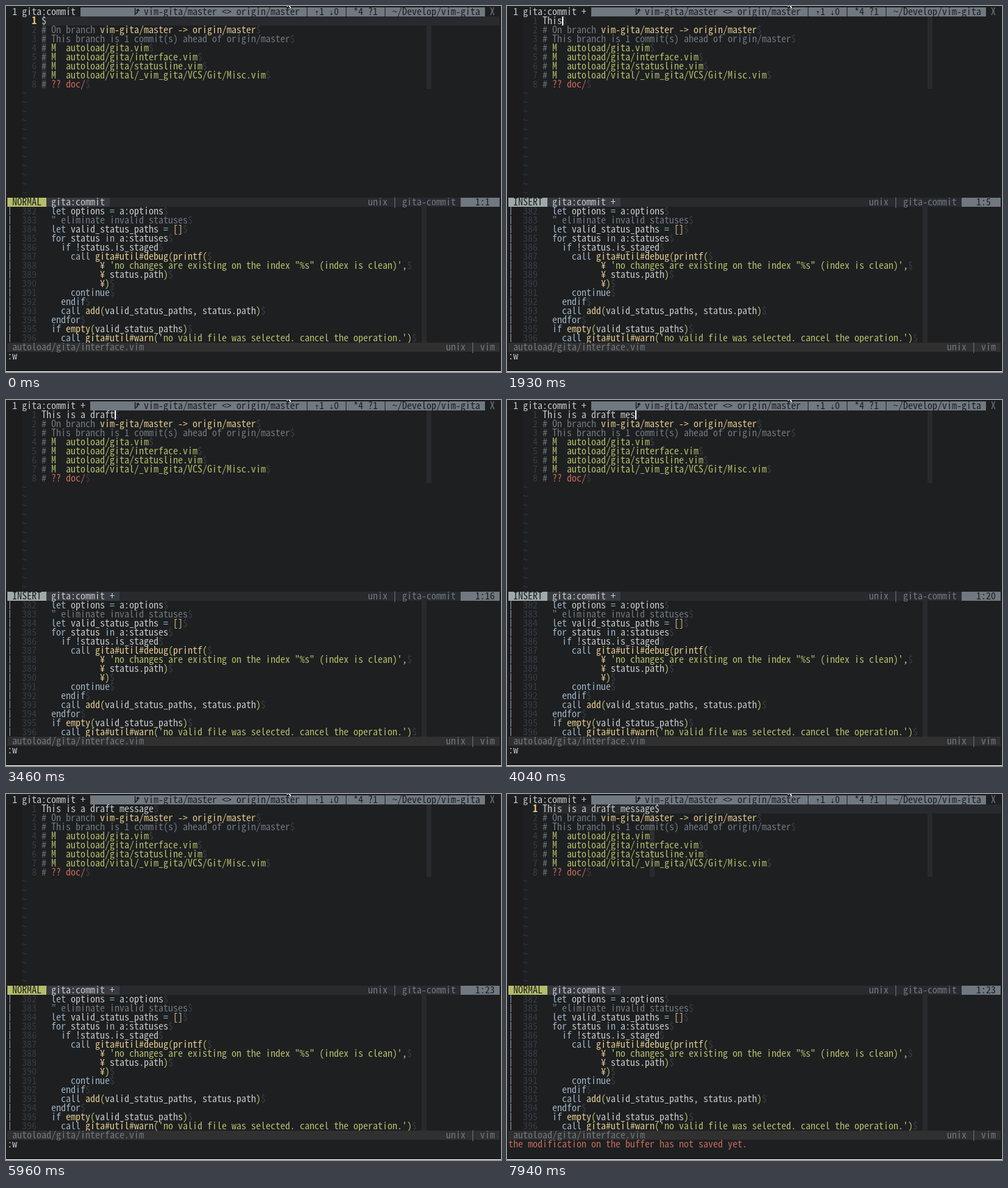
Write an HTML page that moves like this. It is 711 by 525 pixels and loops after 8 s.

```html
<!DOCTYPE html>
<html lang="en">
<head>
<meta charset="utf-8">
<title>Commit message in an editor</title>
<style>
  html, body { margin: 0; width: 100%; height: 100%; overflow: hidden; background: #1d1f21; }
  svg { display: block; width: 711px; height: 525px; }
  text { white-space: pre; font: 14px "Noto Sans Mono CJK JP", "Noto Sans Mono", monospace; font-variant-ligatures: none; }
  .plain text { font: 11.667px "Noto Sans Mono", "DejaVu Sans Mono", monospace; }
  svg text.arrow { font: 11.6px "DejaVu Sans Mono", monospace; }
  svg text.bold { font-weight: 700; }
</style>
</head>
<body>
<svg id="stage" viewBox="0 0 711 525" xmlns="http://www.w3.org/2000/svg"></svg>
<script>
const NS = 'http://www.w3.org/2000/svg';
const CELL = 7, LINE = 13, PAD = 2, COLS = 101, LOOP = 8000;
const C = {
  bg: '#1d1f21', gutter: '#1c1c1c', fg: '#c5c8c6', dim: '#373b41', panel: '#282a2e', idle: '#303030',
  gray: '#707880', key: '#9db0bf', blue: '#81a2be', green: '#b5bd68', yellow: '#f0c674',
  cream: '#e0c88c', red: '#c66a58', aqua: '#8abeb7', insert: '#a0a9a9', cursor: '#f4f4f4'
};
const stage = document.getElementById('stage');

// Without the half-em face, use one whose advance is 0.6 em.
const probe = document.createElement('canvas').getContext('2d');
probe.font = '14px "Noto Sans Mono CJK JP", monospace';
if (Math.abs(probe.measureText('mmmmmmmmmm').width - 70) > 0.6) stage.classList.add('plain');

function add(parent, tag, attrs, content) {
  const el = document.createElementNS(NS, tag);
  for (const name in attrs) el.setAttribute(name, attrs[name]);
  if (content !== undefined) el.textContent = content;
  parent.appendChild(el);
  return el;
}
const X = col => PAD + col * CELL;
const Y = row => PAD + row * LINE;

function box(g, col, row, cols, rows, fill) {
  add(g, 'rect', { x: X(col), y: Y(row), width: cols * CELL, height: rows * LINE, fill });
}
function put(g, col, row, str, fill, cls = '') {
  add(g, 'text', { x: X(col), y: Y(row) + 11, fill, class: cls, 'xml:space': 'preserve' }, str);
}
// Writes [colour, text, colour, text, ...] from a column and returns the end column.
function runs(g, col, row, parts) {
  for (let i = 0; i < parts.length; i += 2) {
    put(g, col, row, parts[i + 1], C[parts[i]]);
    col += parts[i + 1].length;
  }
  return col;
}

const code = [
  [2, 'key', 'let ', 'fg', 'options ', 'aqua', '= ', 'fg', 'a:options'],
  [2, 'gray', '" eliminate invalid statuses'],
  [2, 'key', 'let ', 'fg', 'valid_status_paths ', 'aqua', '= ', 'cream', '[]'],
  [2, 'key', 'for ', 'fg', 'status ', 'key', 'in ', 'fg', 'a:statuses'],
  [4, 'key', 'if ', 'fg', '!status.is_staged'],
  [6, 'key', 'call ', 'cream', 'gita#util#debug', 'green', '(', 'cream', 'printf', 'green', '('],
  [12, 'cream', '¥ ', 'green', '\'no changes are existing on the index "%s" (index is clean)\'', 'fg', ','],
  [12, 'cream', '¥ ', 'fg', 'status.path', 'green', ')'],
  [12, 'cream', '¥', 'green', ')'],
  [6, 'key', 'continue'],
  [4, 'key', 'endif'],
  [4, 'key', 'call ', 'cream', 'add', 'green', '(', 'fg', 'valid_status_paths, status.path', 'green', ')'],
  [2, 'key', 'endfor'],
  [2, 'key', 'if ', 'cream', 'empty', 'green', '(', 'fg', 'valid_status_paths', 'green', ')'],
  [4, 'key', 'call ', 'cream', 'gita#util#warn', 'green', "('no valid file was selected. cancel the operation.')"]
];
const info = [
  ['gray', '# On branch ', 'cream', 'vim-gita/master -> origin/master'],
  ['gray', '# This branch is 1 commit(s) ahead of origin/master'],
  ...['gita.vim', 'gita/interface.vim', 'gita/statusline.vim', 'vital/_vim_gita/VCS/Git/Misc.vim']
    .map(file => ['gray', '# ', 'green', 'M  autoload/' + file]),
  ['gray', '# ', 'red', '?? doc/']
];

const under = add(stage, 'g', {});
const base = add(stage, 'g', {});
const live = add(stage, 'g', {});

function drawBase(g) {
  box(g, 0, 1, 3, 20, C.gutter);
  info.forEach((parts, i) => {
    put(g, 5, i + 2, String(i + 2), C.dim);
    put(g, runs(g, 7, i + 2, parts), i + 2, '$', C.dim);
  });
  for (let row = 9; row < 21; row++) put(g, 3, row, '~', C.dim);

  box(g, 0, 22, 3, 15, C.gutter);
  box(g, 85, 22, 1, 15, C.panel);
  code.forEach(([indent, ...parts], i) => {
    const row = i + 22;
    add(g, 'rect', { x: 5, y: Y(row), width: 1, height: 12, fill: C.blue });
    put(g, 3, row, String(382 + i), C.dim);
    put(g, runs(g, 7 + indent, row, parts), row, '$', C.dim);
  });
  box(g, 0, 37, COLS, 1, C.idle);
  put(g, 1, 37, 'autoload/gita/interface.vim', C.gray);
  put(g, 90, 37, 'unix | vim', C.gray);
  add(g, 'rect', { x: 0, y: 524, width: 711, height: 1, fill: '#fff' });
}

function drawTabs(g, changed) {
  const left = changed ? 17 : 15;
  put(g, 1, 0, '1 gita:commit' + (changed ? ' +' : ''), C.fg);
  box(g, left, 0, 98 - left, 1, C.gray);
  add(g, 'path', { d: 'M185.5 3v10M185.5 11q4-1 4-5M187.5 7l2-2.5 2 2.5', fill: 'none', stroke: C.bg, 'stroke-width': 1.4 });
  put(g, 28, 0, 'vim-gita/master <> origin/master |', C.bg);
  put(g, 63, 0, '⇡', C.bg, 'arrow');
  put(g, 64, 0, '1', C.bg);
  put(g, 66, 0, '⇣', C.bg, 'arrow');
  put(g, 67, 0, '0 | *4 ?1 | ~/Develop/vim-gita', C.bg);
  put(g, 99, 0, 'X', C.gray);
  add(g, 'path', { d: 'M402 0h9v3l-2 1-2-2-2 2-3-2z', fill: C.bg });
  add(g, 'path', { d: 'M403 0h2l-1 1.5zM406 0h2l2 3-1.5.5z', fill: '#fff' });
}

function drawStatus(g, s) {
  const insert = s.mode === 'INSERT';
  box(g, 0, 21, COLS, 1, C.panel);
  box(g, 0, 21, 8, 1, insert ? C.insert : C.green);
  put(g, 1, 21, s.mode, C.bg);
  box(g, 8, 21, s.changed ? 15 : 13, 1, C.dim);
  put(g, 9, 21, 'gita:commit' + (s.changed ? ' +' : ''), C.fg);
  put(g, 74, 21, 'unix | gita-commit', C.gray);
  box(g, 93, 21, 8, 1, C.gray);
  put(g, 96, 21, '1:' + s.pos, C.bg);
}

const MESSAGE = 'This is a draft message';
function draw(s) {
  under.replaceChildren();
  live.replaceChildren();
  const text = MESSAGE.slice(0, s.typed), at = 6 + s.pos;

  box(under, 86, 1, 1, 8, C.panel);
  if (s.lit) {
    box(under, 7, 1, COLS - 7, 1, C.panel);
    box(under, at, 2, 1, 7, C.panel);
  }

  drawTabs(live, s.changed);
  put(live, 5, 1, '1', s.lit ? C.yellow : C.dim, s.lit ? 'bold' : '');
  put(live, 7, 1, text, C.fg);
  if (s.eol) put(live, 7 + text.length, 1, '$', s.lit ? C.fg : C.dim);
  if (s.cursor === 'block') {
    box(live, at, 1, 1, 1, C.cursor);
    put(live, at, 1, (text + '$')[s.pos - 1], C.bg);
  } else if (s.cursor === 'bar') {
    box(live, at, 1, 2 / CELL, 1, C.cursor);
  }
  drawStatus(live, s);
  put(live, 0, 38, s.note, s.note[0] === ':' ? C.fg : C.red);
  if (s.pending) put(live, 90, 39, s.pending, C.fg);
}

// Each step gives the time and what changes then.
const on = { cursor: 'block' }, off = { cursor: '' };
const steps = [
  [0, { typed: 0, pos: 1, mode: 'NORMAL', changed: false, lit: true, eol: true, cursor: '', note: ':w', pending: '' }],
  [40, on], [410, off], [640, on],
  [990, { mode: 'INSERT', cursor: 'bar' }],
  [1430, { typed: 1, eol: false, cursor: '' }],
  [1470, { pos: 2, changed: true, lit: false, eol: true, cursor: 'bar' }]
];
const keys = [1600, 1760, 1930, 2080, 2170, 2260, 2360, 2450, 2600, 2720, 2890,
  3060, 3240, 3460, 3730, 3770, 3810, 4040, 4180, 4360, 4900, 4940];
keys.forEach((t, i) => steps.push([t, { typed: i + 2, pos: i + 3 }]));
steps.push(
  [5250, { mode: 'NORMAL', pos: 23, cursor: 'block' }],
  [5960, off],
  [6140, { cursor: 'block', pending: 'Z' }],
  [6220, { pending: '' }],
  [6290, { note: 'the modification on the buffer has not saved yet.' }],
  [6940, off], [7190, on], [7290, { lit: true }], [7940, off]
);

let shown = -1;
const start = performance.now();
function tick() {
  const t = Math.max(0, performance.now() - start) % LOOP;
  const count = steps.filter(([when]) => when <= t).length;
  if (count !== shown) {
    shown = count;
    draw(Object.assign({}, ...steps.slice(0, count).map(([, change]) => change)));
  }
  requestAnimationFrame(tick);
}
drawBase(base);
tick();
</script>
</body>
</html>
```
